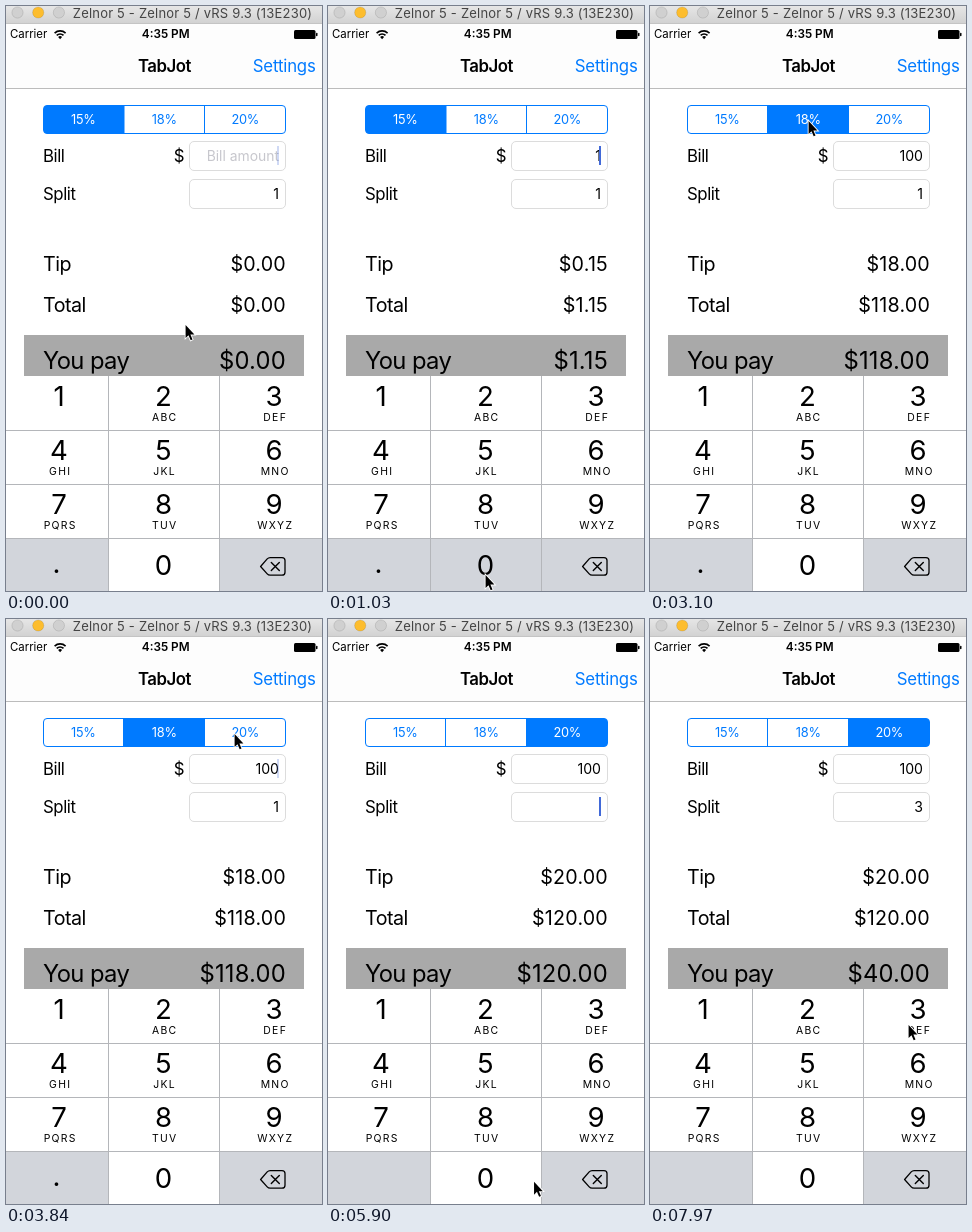
Write an HTML page that moves like this. It is 316 px wide and 585 px high and loops after 8000 ms.

```html
<!DOCTYPE html>
<html lang="en">
<head>
<meta charset="utf-8">
<title>Tip calculator</title>
<style>
  html, body { margin: 0; width: 100%; height: 100%; overflow: hidden; background: #fff; }
  svg { display: block; width: 100vw; height: 100vh; }
  text { font-family: Inter, Roboto, "Liberation Sans", sans-serif; white-space: pre; }
  .tight { letter-spacing: -.026em; }
  .wide { letter-spacing: 1.3px; }
</style>
</head>
<body>
<svg id="stage" viewBox="0 0 316 585">
  <defs>
    <linearGradient id="bar" x2="0" y2="1">
      <stop offset="0" stop-color="#e6e6e6"/>
      <stop offset="1" stop-color="#d2d2d2"/>
    </linearGradient>
    <clipPath id="pill"><rect x="37.5" y="99.5" width="242" height="28" rx="3.5"/></clipPath>
  </defs>
</svg>
<script>
const LOOP = 8000, STEP = 147.6;
const BLUE = '#007aff', KEY_GREY = '#d2d5db';
const RATES = [15, 18, 20];
const stage = document.getElementById('stage');

function add(tag, attrs) {
  const el = document.createElementNS('http://www.w3.org/2000/svg', tag);
  set(el, attrs);
  stage.append(el);
  return el;
}
function set(el, attrs) {
  for (const name in attrs) el.setAttribute(name, attrs[name]);
}
function label(str, x, y, size, attrs = {}) {
  const el = add('text', { x, y, 'font-size': size, ...attrs });
  el.textContent = str;
  return el;
}
const rect = (x, y, width, height, fill, more = {}) => add('rect', { x, y, width, height, fill, ...more });
const line = (d, stroke, more = {}) => add('path', { d, stroke, fill: 'none', ...more });
const mid = { 'text-anchor': 'middle' }, end = { 'text-anchor': 'end' }, tight = { class: 'tight' };

// Window bar
rect(0, 0, 316, 585, '#fff');
rect(0, 18, 316, 64, '#fdfdfd');
rect(0, 0, 316, 17, 'url(#bar)');
line('M0 17.5H316', '#c4c4c4');
['#d0d0d0', '#fdbd2e', '#d0d0d0'].forEach((fill, i) =>
  add('circle', { cx: 11.5 + 20.7 * i, cy: 6.5, r: 5.6, fill, stroke: '#0002', 'stroke-width': .8 }));
label('Zelnor 5 - Zelnor 5 / vRS 9.3 (13E230)', 186.5, 11.7, 13, { ...mid, fill: '#444', 'letter-spacing': '.2' });

// Status and navigation
label('Carrier', 4, 32.3, 11.4);
line('M48.6 27.1a8 8 0 0 1 11 0M50.7 29.4a5 5 0 0 1 6.8 0', '#000', { 'stroke-width': 1.6 });
add('path', { d: 'M54.1 33.2l-2-2.2a3 3 0 0 1 4 0z' });
label('4:35 PM', 159.7, 32.3, 11.8, { ...mid, 'font-weight': 600 });
rect(288, 24, 21.5, 9, '#000', { rx: 1.5 });
rect(310, 26.7, 1.5, 3.6, '#000', { rx: .7 });
label('TabJot', 158.5, 66, 16.8, { ...mid, ...tight, 'font-weight': 600 });
label('Settings', 309.5, 66, 16.8, { ...end, 'letter-spacing': '-.25', fill: BLUE });
line('M0 82.5H316', '#bcbcbc');

// Tip rates
const edge = i => Math.floor(37 + 242 / 3 * i) + .5;
const chosen = rect(0, 99, 81, 29, BLUE, { 'clip-path': 'url(#pill)' });
rect(37.5, 99.5, 242, 28, 'none', { rx: 3.5, stroke: BLUE });
line(`M${edge(1)} 99.5v28M${edge(2)} 99.5v28`, BLUE);
const rateTexts = RATES.map((r, i) => label(r + '%', 77.3 + 81 * i, 118, 12.8, { ...mid, 'letter-spacing': '-.2' }));

// Form and sums
label('Bill', 37, 155.5, 16.8, tight);
label('Split', 37, 193.5, 16.8, tight);
label('$', 178.5, 155.5, 16.8, end);
[135.5, 173.5].forEach(y => rect(183.5, y, 96, 29, '#fff', { rx: 4.5, stroke: '#dcdcdc' }));
const hint = label('Bill amount', 273, 154.5, 13.9, { ...end, fill: '#c7c7cd' });
const billText = label('', 273, 154.5, 14.1, end);
const splitText = label('', 273, 192.5, 14.1, end);
const caret = rect(271, 140, 2, 19, '#4169d8');

rect(18, 329, 280, 41, '#a9a9a9');
const sums = [['Tip', 264.5, 19.7], ['Total', 305.5, 19.7], ['You pay', 362.7, 23.8]].map(([name, y, size]) => {
  label(name, 37, y, size, tight);
  return label('', 280, y, size, { ...end, 'letter-spacing': '.2' });
});

// Keypad
const colX = [0, 103, 214, 316], keyMid = [53, 157.5, 268];
const rowY = [370, 425, 479, 533, 585];
const letters = ',ABC,DEF,GHI,JKL,MNO,PQRS,TUV,WXYZ'.split(',');
const keys = {};
[...'123456789.0<'].forEach((id, i) => {
  const c = i % 3, r = Math.floor(i / 3), base = 399.5 + 54 * r;
  const plain = !'.<'.includes(id);
  const box = rect(colX[c], rowY[r], colX[c + 1] - colX[c], rowY[r + 1] - rowY[r]);
  const text = label(id === '<' ? '' : id, keyMid[c], plain ? Math.min(base, 569.5) - (id === '0' ? -8 : 0) : 566.5, 27.6, mid);
  if (id === '0') set(text, { y: 569.3 });
  if (id === '.') set(text, { x: 50.5 });
  keys[id] = { box, text, idle: plain ? '#fff' : KEY_GREY, held: plain ? KEY_GREY : '#fff' };
  if (letters[i]) label(letters[i], keyMid[c] + 1.2, base + 15.7, 10.4, { ...mid, class: 'wide' });
});
line('M102.5 370V585M213.5 370V585M0 424.5H316M0 478.5H316M0 532.5H316', '#b4b6ba');
const eraser = line('M254.6 560.5l6.6-7.6q1.2-1.3 2.9-1.3H276q3 0 3 3v11.6q0 3-3 3H264.1q-1.7 0-2.9-1.3z', '#000',
  { 'stroke-width': 1.3, 'stroke-linejoin': 'round' });
const cross = line('M265.3 556.5l8 8m0-8l-8 8', '#000', { 'stroke-width': 1.4, 'stroke-linecap': 'round' });

const pointer = add('path', {
  d: 'M.6 1V14L3.5 11.2 5.7 16.2 7.5 15.4 5.4 10.5H9.4z',
  stroke: '#fff', 'stroke-width': 1.8, 'paint-order': 'stroke'
});

// The session: where the pointer arrives, in steps, and what it taps there
const HOLD = .6;
const session = [
  { at: 0, x: 179, y: 318 },
  { at: 3, x: 55, y: 392, key: '1' },
  { at: 7, x: 157, y: 568, key: '0' },
  { at: 8.3, x: 157, y: 568, key: '0' },
  { at: 16, x: 163, y: 475, span: 1 },
  { at: 19, x: 158, y: 114, rate: 1 },
  { at: 26.5, x: 230, y: 114, rate: 2 },
  { at: 31, x: 282, y: 190, focus: 'split' },
  { at: 34, x: 286, y: 409 },
  { at: 37, x: 256, y: 560, key: '<' },
  { at: 42, x: 165, y: 563, key: '0' },
  { at: 46, x: 256, y: 560, key: '<' },
  { at: 49.5, x: 258, y: 405, key: '3' }
];
session.forEach((stop, i) => {
  const prev = session[i - 1] || stop;
  stop.prev = prev;
  stop.leave = Math.max(stop.at - (stop.span || 3), prev.at + (prev.key || prev.focus ? HOLD : 0));
});

function pointerAt(k) {
  const stop = session.filter(s => s.leave <= k).pop();
  const { prev, leave, at } = stop;
  const u = at > leave ? Math.min(1, (k - leave) / (at - leave)) : 1;
  const ease = u * (2 - u);
  return [prev.x + (stop.x - prev.x) * ease, prev.y + (stop.y - prev.y) * ease];
}

// Replays the taps made so far; erasing acts on touch, the rest on release
function stateAt(k) {
  const s = { bill: '', split: '1', focus: 'bill', rate: 0, held: '', edited: -3.7 };
  for (const { at, key, rate, focus } of session) {
    if (at > k) break;
    const released = k >= at + HOLD;
    if (key || focus) s.edited = at;
    if (key && !released) s.held = key;
    if (key === '<') s[s.focus] = s[s.focus].slice(0, -1);
    else if (released) {
      if (key) s[s.focus] += key;
      if (rate) s.rate = rate;
      if (focus) s.focus = focus;
    }
  }
  return s;
}

function caretAlpha(age) {
  const phase = age % 1000;
  return phase < 450 ? 1 : phase < 640 ? .25 : 0;
}

function render(t) {
  const k = Math.floor((t + 8) / STEP);
  const { bill, split, focus, rate, held, edited } = stateAt(k);

  set(chosen, { x: edge(rate) });
  rateTexts.forEach((el, i) => set(el, { fill: i === rate ? '#fff' : BLUE }));
  set(hint, { opacity: bill ? 0 : 1 });
  billText.textContent = bill;
  splitText.textContent = split;
  const tip = bill * RATES[rate] / 100, total = +bill + tip;
  [tip, total, total / (+split || 1)].forEach((v, i) => sums[i].textContent = '$' + v.toFixed(2));

  for (const id in keys) set(keys[id].box, { fill: id === held ? keys[id].held : keys[id].idle });
  set(eraser, { fill: held === '<' ? '#000' : 'none' });
  set(cross, { stroke: held === '<' ? '#fff' : '#000' });
  set(keys['.'].text, { opacity: focus === 'bill' ? 1 : 0 });

  set(caret, { y: focus === 'bill' ? 140 : 178, opacity: caretAlpha((k - edited) * STEP) });
  set(pointer, { transform: `translate(${pointerAt(k)})` });
}

const start = performance.now();
function tick() {
  render((performance.now() - start) % LOOP);
  requestAnimationFrame(tick);
}
render(0);
requestAnimationFrame(tick);
</script>
</body>
</html>
```
